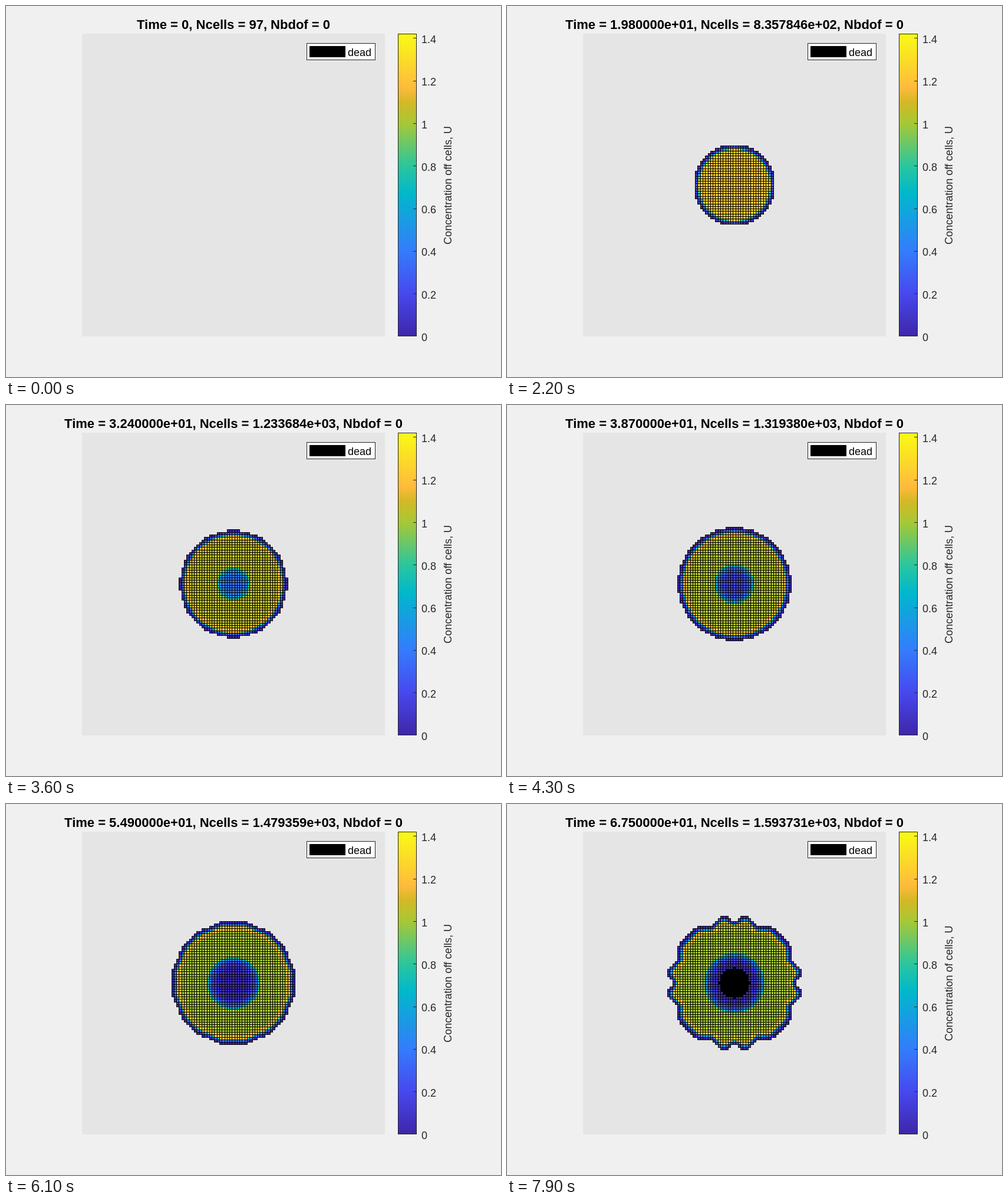
Animation, 840 px wide and 630 px high, one loop 8000 ms. Source, as an HTML page with a canvas:

```html
<!DOCTYPE html>
<html lang="en">
<head>
<meta charset="utf-8">
<title>Cell growth</title>
<style>
  html, body { margin: 0; width: 100%; height: 100%; overflow: hidden; background: #f0f0f0; }
  canvas { display: block; }
</style>
</head>
<body>
<canvas id="stage" width="840" height="630"></canvas>
<script>
const ctx = document.getElementById('stage').getContext('2d');
const FONT = '"Liberation Sans", Arial, sans-serif';
const INK = '#262626';
const CX = 386, CY = 304, CELL = 514 / 120;
const BAR = { x: 665, y: 47, w: 32, h: 514, max: 1.422 };
const STEP = 100, STEPS = 80, RESTART = 76;

// Key colours of the concentration scale
const SCALE = [
  [0, '#3e26a8'], [0.2, '#4748ee'], [0.4, '#347cfd'], [0.67, '#00b8cc'], [0.8, '#2ac69e'],
  [1, '#a6c836'], [1.1, '#d4b826'], [1.17, '#ffbb3c'], [BAR.max, '#f9fb14']
];
// Simulation time and cell count shown by the counter
const COUNTS = [
  [0, 97], [13.5, 523.5821], [26.1, 1147.987], [38.7, 1319.38],
  [47.7, 1413.78], [63, 1553.135], [67.5, 1593.731]
];

const clamp = (v, lo, hi) => Math.min(hi, Math.max(lo, v));
const mix = (a, b, k) => a + (b - a) * k;

// Finds the pair of keys around x and the fraction between them
function between(keys, x) {
  let i = 1;
  while (i < keys.length - 1 && x > keys[i][0]) i++;
  const [x0, a] = keys[i - 1], [x1, b] = keys[i];
  return [a, b, clamp((x - x0) / (x1 - x0), 0, 1)];
}

const rgb = hex => [1, 3, 5].map(p => parseInt(hex.slice(p, p + 2), 16));

function colour(v) {
  const [a, b, k] = between(SCALE, v);
  const to = rgb(b);
  return `rgb(${rgb(a).map((c, n) => Math.round(mix(c, to[n], k))).join(',')})`;
}

function label(text, x, y, size, align, fill, weight = '') {
  ctx.font = `${weight} ${size}px ${FONT}`;
  ctx.textAlign = align;
  ctx.fillStyle = fill;
  ctx.fillText(text, x, y);
}

function number(v) {
  if (Math.abs(v - Math.round(v)) < 1e-9) return String(Math.round(v));
  return v.toExponential(6).replace(/e\+(\d)$/, 'e+0$1');
}

function drawBar(name) {
  const { x, y, w, h, max } = BAR;
  const grad = ctx.createLinearGradient(0, y + h, 0, y);
  for (const [v, hex] of SCALE) grad.addColorStop(v / max, hex);
  ctx.fillStyle = grad;
  ctx.fillRect(x, y, w, h);
  ctx.strokeStyle = INK;
  ctx.lineWidth = 1;
  ctx.strokeRect(x + 0.5, y + 0.5, w - 1, h - 1);
  for (let i = 0; i <= 7; i++) {
    const ty = y + h - i * 0.2 / max * h;
    if (i > 0) {
      ctx.fillStyle = INK;
      ctx.fillRect(x + w - 6, Math.floor(ty), 6, 1);
    }
    label(String(i * 2 / 10), 705, Math.round(ty + 8), 18, 'left', INK);
  }
  ctx.save();
  ctx.translate(756, CY + 0.5);
  ctx.rotate(-Math.PI / 2);
  label(name, 0, 0, 18, 'center', INK);
  ctx.restore();
}

function drawLegend() {
  ctx.fillStyle = '#fff';
  ctx.fillRect(510, 63, 117, 29);
  ctx.strokeStyle = INK;
  ctx.strokeRect(510.5, 63.5, 116, 28);
  ctx.fillStyle = '#000';
  ctx.fillRect(515, 68, 61, 19);
  label('dead', 580, 85, 18, 'left', '#000');
}

// Colony radius in cells: steady spread, then slow logarithmic growth
const radiusAt = t => Math.min(5.4 + 0.4715 * t ** 1.04, 22.2 + 6.2 * Math.log(Math.max(t, 1) / 38.7));

// Fingering of the rim, with the four-fold symmetry of the grid
function bulge(angle) {
  const c = n => Math.cos(4 * n * angle);
  return 0.1 - 0.18 * c(1) + 0.48 * c(2) - 0.37 * c(3) - 0.75 * c(4) - 0.18 * c(5);
}

function drawCells(t) {
  const radius = radiusAt(t);
  const lobes = 1.12 * (t / 67.5) ** 7;
  const body = 1 + 0.42 * Math.min(t / 4, 1, Math.exp((13.5 - t) / 9));
  const crest = 0.0045 * t;
  const rim = clamp(t / 2, 0, 1);
  const core = body * Math.min(1, Math.exp((22.5 - t) / 9.5));
  const coreR = Math.sqrt(2.6 * Math.max(0, t - 19));
  const deadArea = 4 * (t - 58.5);

  function level(r, depth) {
    let v = body + crest * Math.exp(-(((depth - 2.6) / 0.8) ** 2));
    if (core < body && r < coreR + 1) {
      const inner = mix(core, (core + 1) / 2, Math.min(1, r / coreR) ** 5);
      v = mix(inner, v, clamp(r - coreR, 0, 1));
    }
    return v * mix(1, clamp(depth / 2, 0, 1) ** 2, rim);
  }

  const edge = (centre, n) => Math.floor(centre + (n - 0.5) * CELL);
  for (let j = -28; j <= 28; j++) {
    for (let i = -28; i <= 28; i++) {
      const r = Math.hypot(i, j);
      const depth = radius + lobes * bulge(Math.atan2(j, i)) - r;
      if (depth < 0) continue;
      const x = edge(CX, i), w = edge(CX, i + 1) - x;
      const y = edge(CY, j), h = edge(CY, j + 1) - y;
      ctx.fillStyle = '#000';
      ctx.fillRect(x, y, w + 1, h + 1);
      if (deadArea > 0 && r * r <= deadArea + 1e-6) continue;
      ctx.fillStyle = colour(level(r, depth));
      ctx.fillRect(x + 1, y + 1, w - 1, h - 1);
    }
  }
}

function draw(step) {
  // The run is resumed four steps back, with a corrected axis name
  const resumed = step >= RESTART;
  const time = (resumed ? step - 4 : step) * 9 / 10;
  ctx.fillStyle = '#f0f0f0';
  ctx.fillRect(0, 0, 840, 630);
  ctx.fillStyle = '#e5e5e5';
  ctx.fillRect(129, 47, 514, 514);
  drawCells(time);
  const count = mix(...between(COUNTS, time));
  label(`Time = ${number(time)}, Ncells = ${number(count)}, Nbdof = 0`, CX, 39, 22, 'center', '#000', 'bold');
  drawBar(`Concentration ${resumed ? 'of' : 'off'} cells, U`);
  drawLegend();
}

let start = null, shown = -1;
function tick(now) {
  if (start === null) start = now;
  const step = Math.floor(Math.max(0, now - start) / STEP) % STEPS;
  if (step !== shown) draw(shown = step);
  requestAnimationFrame(tick);
}
draw(shown = 0);
requestAnimationFrame(tick);
</script>
</body>
</html>
```
